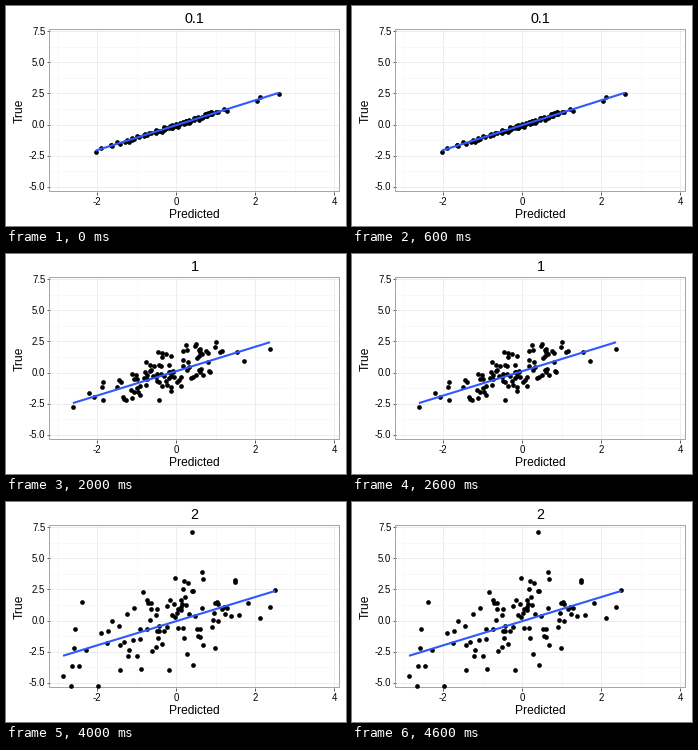
Animation, 340 px wide and 220 px high, one loop 5 s. Source, as a matplotlib script:

```python
import numpy as np
import matplotlib.pyplot as plt
from matplotlib.animation import FuncAnimation

W, H, DPI = 340, 220, 100
PT = 72 / DPI                       # points per pixel
LEFT, RIGHT, TOP, BOTTOM = 43.5, 333.5, 23.5, 185.5
X0, Y0, SX, SY = 170, 118.5, 39.5, 12.45
POINTS = 100

plt.rcParams["font.family"] = "Liberation Sans"

# noise level, fitted slope and intercept, then the extreme observations
PANELS = [
    (0.1, 1.00, -0.06, [(-2.03, -2.21), (2.61, 2.45)]),
    (0.5, 1.04, 0.05, [(-2.71, -3.53), (3.82, 4.02)]),
    (1.0, 0.98, 0.10, [(-2.61, -2.81), (2.38, 1.89)]),
    (1.5, 1.07, 0.12, [(-2.18, -0.72), (0.43, 4.22), (2.25, 1.53)]),
    (2.0, 0.97, -0.06, [(-2.86, -4.46), (0.41, 7.07), (2.51, 2.45)]),
]


def truncated(rng, low, high, n):
    """Standard normal draws kept between low and high."""
    draws = rng.normal(size=20 * n)
    return draws[(draws > low) & (draws < high)][:n]


def build(noise, slope, intercept, extremes):
    rng = np.random.default_rng(int(10 * noise))
    extremes = np.array(extremes)
    ends = extremes[[0, -1], 0]
    n = POINTS - len(extremes)
    x = truncated(rng, *ends, n)
    y = slope * x + intercept + noise * truncated(rng, -2, 2, n)
    points = np.vstack([extremes, np.column_stack([x, y])])
    return f"{noise:g}", points, ends, slope * ends + intercept


panels = [build(*p) for p in PANELS]

fig = plt.figure(figsize=(W / DPI, H / DPI), dpi=DPI, facecolor="white")
ax = fig.add_axes([LEFT / W, 1 - BOTTOM / H, (RIGHT - LEFT) / W, (BOTTOM - TOP) / H])
ax.set_xlim((LEFT - X0) / SX, (RIGHT - X0) / SX)
ax.set_ylim((Y0 - BOTTOM) / SY, (Y0 - TOP) / SY)
ax.set_axisbelow(True)

x_major, y_major = np.arange(-2, 5, 2), np.arange(-5, 8, 2.5)
ax.set_xticks(x_major, labels=[""] * len(x_major))
ax.set_yticks(y_major, labels=[""] * len(y_major))
ax.set_xticks(np.arange(-3, 4, 2), minor=True)
ax.set_yticks(y_major[:-1] + 1.25, minor=True)
ax.grid(which="minor", color="#f8f8f8", lw=PT)
ax.grid(which="major", color="#ededed", lw=PT)
ax.tick_params(which="major", length=3 * PT, width=0.8 * PT, color="#333333")
ax.tick_params(which="minor", length=0)
for spine in ax.spines.values():
    spine.set(color="#a6a6a6", lw=PT, snap=False)


def label(x, y, text, size, **kw):
    kw = {"ha": "center", "va": "baseline", **kw}
    return fig.text(x / W, 1 - y / H, text, fontsize=size * PT, color="black", **kw)


for v in x_major:
    label(X0 + SX * v, 199, str(v), 9.6)
for v in y_major:
    label(39.3, Y0 - SY * v + 3.5, f"{v:.1f}", 9.6, ha="right")
label(188.5, 212, "Predicted", 12)
label(17, 105, "True", 12, rotation=90, rotation_mode="anchor")
title = label(188.5, 17, "", 14.4)

dots, = ax.plot([], [], "o", color="black", ms=4.7 * PT, mew=0, zorder=3)
line, = ax.plot([], [], color="#3058ff", lw=2.1 * PT, zorder=4, solid_capstyle="butt")


def update(i):
    text, points, fit_x, fit_y = panels[i % len(panels)]
    title.set_text(text)
    dots.set_data(points[:, 0], points[:, 1])
    line.set_data(fit_x, fit_y)
    return title, dots, line


anim = FuncAnimation(fig, update, frames=len(panels), init_func=lambda: update(0),
                     interval=1000, repeat=True, repeat_delay=0)
plt.show()
```
